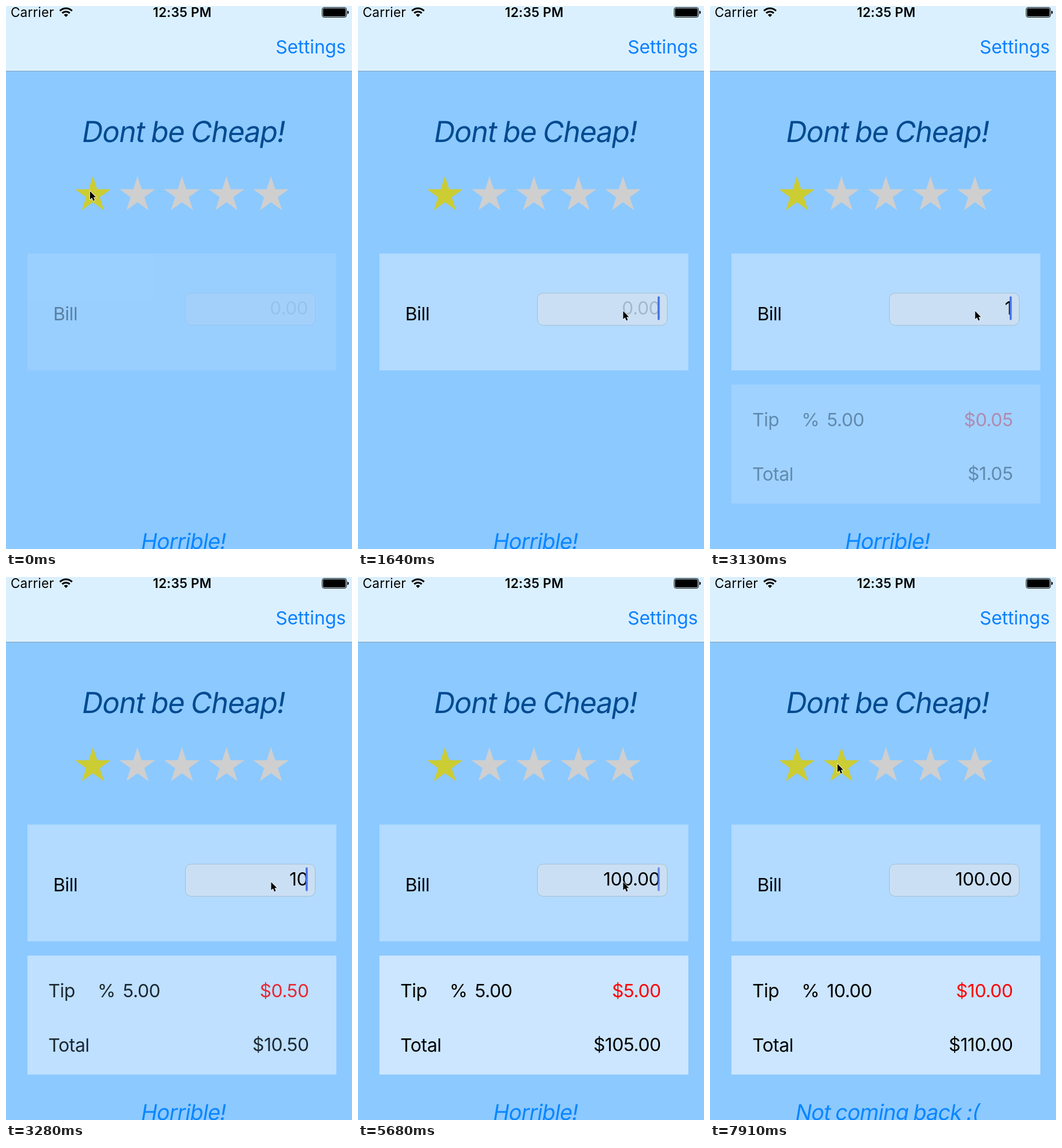
These frames come from a looping animation (597x938 px, 8000 ms). An HTML page:

```html
<!DOCTYPE html>
<html lang="en">
<head>
<meta charset="utf-8">
<title>Tip calculator</title>
<style>
  html, body { margin: 0; height: 100%; overflow: hidden; background: #8cc9ff; }
  svg { display: block; font: 31.7px Inter, "Open Sans", sans-serif; letter-spacing: -.014em; }
  .end { text-anchor: end; }
  .mid { text-anchor: middle; }
  .status { font-size: 22.4px; letter-spacing: .01em; }
  .slant { letter-spacing: -.021em; word-spacing: -.04em; }
</style>
</head>
<body>
<svg width="597" height="938" viewBox="0 0 597 938">
  <rect width="597" height="938" fill="#8cc9ff"/>
  <rect width="597" height="112" fill="#dbf0ff"/>
  <rect y="112" width="597" height="1" fill="#7c9fbb"/>

  <text class="status" x="8" y="19">Carrier</text>
  <g fill="none" stroke="#000" stroke-width="3">
    <path d="M93 8.4a15 15 0 0 1 21 0M97 12.4a9.2 9.2 0 0 1 13 0"/>
    <path d="M103.5 19l-3.7-3.8a5.2 5.2 0 0 1 7.4 0z" fill="#000" stroke="none"/>
  </g>
  <text class="status mid" x="304" y="19" font-weight="600">12:35 PM</text>
  <rect x="545.5" y="2.5" width="42" height="17" rx="3.5" fill="none" stroke="#000"/>
  <rect x="547" y="4" width="39" height="14" rx="2"/>
  <path d="M589 8q2.5 .5 2.5 3t-2.5 3z"/>
  <text class="end" x="586.5" y="82" fill="#0a80ff" letter-spacing="-.1">Settings</text>

  <!-- Upright letters are skewed so that the "a" keeps its two storeys. -->
  <text class="slant mid" transform="translate(304 235) skewX(-9.5)" font-size="50" fill="#004a8f">Dont be Cheap!</text>
  <g id="stars"></g>

  <g id="billPanel">
    <rect x="37" y="427.6" width="533" height="201.7" fill="#b2dbff"/>
    <text x="81.5" y="543">Bill</text>
    <rect x="309.5" y="496" width="224" height="55.5" rx="10" fill="#cadff3" stroke="#a6bdd2"/>
    <text id="bill" class="end" x="521" y="533"></text>
  </g>
  <rect id="caret" x="517" y="501.5" width="3.6" height="41" rx="1.6" fill="#4a72e3"/>

  <g id="tipPanel">
    <rect x="37" y="654" width="533" height="205.5" fill="#cce6ff"/>
    <text x="73" y="726">Tip</text>
    <text x="158" y="726">%</text>
    <text id="percent" x="201.5" y="726"></text>
    <text id="tip" class="end" x="522.5" y="726" fill="#f00"></text>
    <text x="73" y="820">Total</text>
    <text id="total" class="end" x="522.5" y="819"></text>
  </g>
  <text id="verdict" class="slant mid" transform="translate(304.5 937.5) skewX(-9.5)" font-size="37.5" fill="#0a86ff"></text>

  <path id="pointer" d="M0 0V14L3.3 11 5.6 16.4 8 15.3 5.8 10.2H10Z" stroke="#fff"
    stroke-width="1.8" stroke-opacity=".75" paint-order="stroke"/>
</svg>
<script>
const LOOP = 8000, STEP = 149.2;
const $ = id => document.getElementById(id);

const starPoints = (cx, cy, radius) => Array.from({ length: 10 }, (_, i) => {
  const r = i % 2 ? radius * .382 : radius, a = i * Math.PI / 5;
  return `${cx + r * Math.sin(a)},${cy - r * Math.cos(a)}`;
}).join(' ');
$('stars').innerHTML = [0, 1, 2, 3, 4].map(i =>
  `<polygon points="${starPoints(150 + i * 76.8, 326.5, 32.5)}"/>`).join('');
const stars = [...$('stars').children];

// Each track lists [step, value]; a value holds until the next entry.
const caretTrack = [[0, 0], [11, 1], [15, .75], [16, 0], [18, 1], [27, .75], [28, 0], [30, 1],
  [38, .75], [39, 0], [41, 1], [45, .75], [46, 0], [48, .5], [49, 1], [52, .75], [53, 0]];
const billTrack = [[0, ''], [20, '1'], [22, '10'], [23, '100'], [31, '100.'], [33, '100.0'], [35, '100.00']];
const billFade = [[0, .36], [1, .82], [2, 1]];
const tipFade = [[0, 0], [20, .04], [21, .31], [22, .8], [23, 1]];
const at = (track, k) => track.findLast(([start]) => start <= k)[1];

const ease = (k, from, to) => {
  const p = Math.min(1, Math.max(0, (k - from) / (to - from)));
  return p * p * (3 - 2 * p);
};

function draw(t) {
  const k = Math.floor(t / STEP + .07);
  const rating = k < 51 ? 1 : 2;
  const bill = at(billTrack, k), tip = bill * rating * .05;

  stars.forEach((star, i) => star.setAttribute('fill', i < rating ? '#cccc33' : '#cfcfcf'));
  $('billPanel').setAttribute('opacity', at(billFade, k));
  $('tipPanel').setAttribute('opacity', at(tipFade, k));
  $('caret').setAttribute('opacity', at(caretTrack, k));

  $('bill').textContent = bill || '0.00';
  $('bill').setAttribute('fill', bill ? '#000' : '#a3b8cd');
  $('percent').textContent = (rating * 5).toFixed(2);
  $('tip').textContent = '$' + tip.toFixed(2);
  $('total').textContent = '$' + (+bill + tip).toFixed(2);
  $('verdict').textContent = rating === 1 ? 'Horrible!' : 'Not coming back :(';

  const out = ease(k, 1, 7), back = ease(k, 40, 48);
  const x = 145 + 312.5 * out - 237.5 * back, y = 320 + 207 * out - 204 * back;
  $('pointer').setAttribute('transform', `translate(${x} ${y})`);
}

const begin = performance.now();
(function tick() {
  draw((performance.now() - begin) % LOOP);
  requestAnimationFrame(tick);
})();
</script>
</body>
</html>
```
